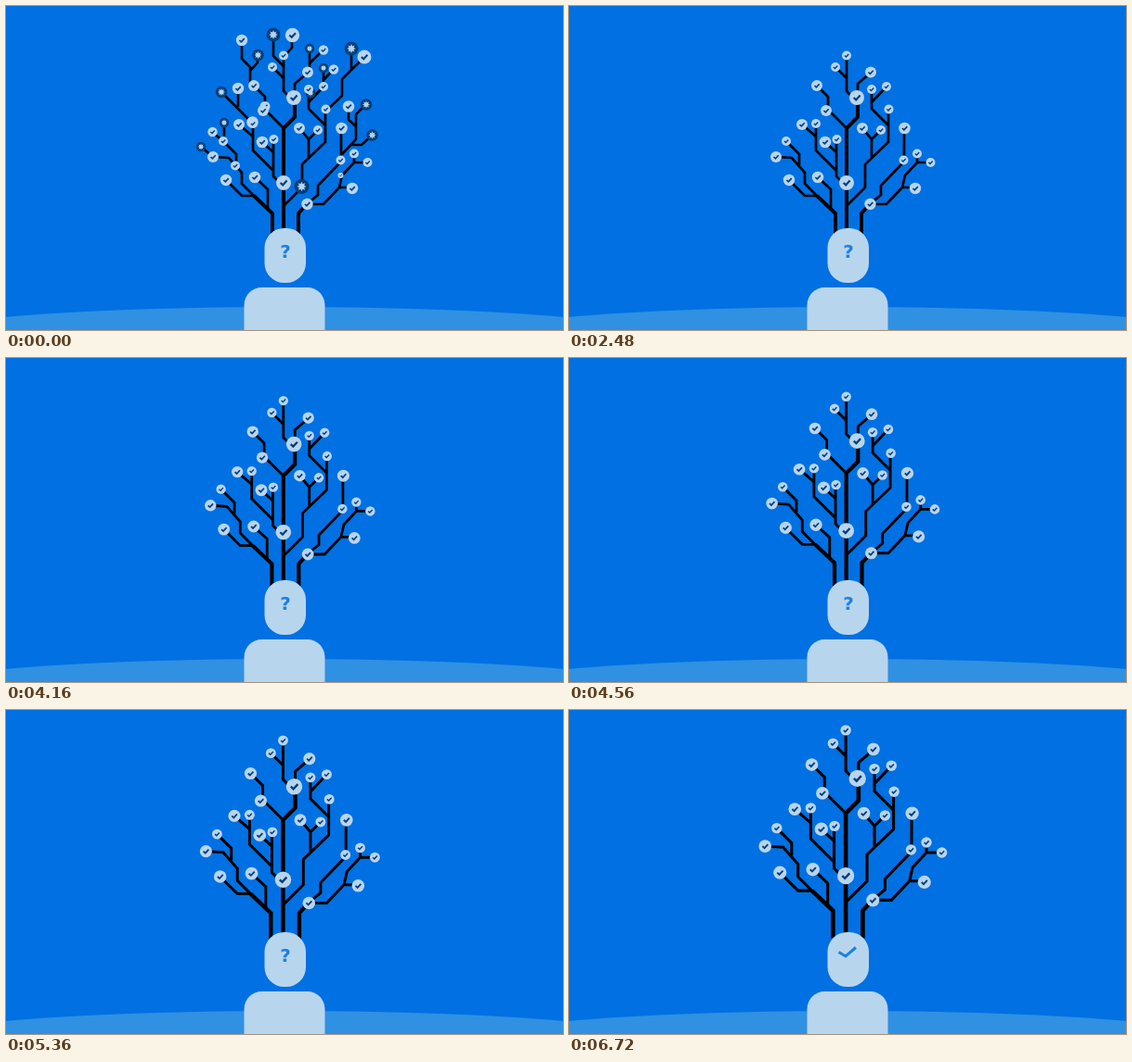
These frames come from a looping animation (600 px wide and 350 px high, 8000 ms). An HTML page with a canvas:

```html
<!DOCTYPE html>
<html lang="en">
<head>
<meta charset="utf-8">
<title>Growing knowledge tree</title>
<style>
html, body { margin: 0; width: 100%; height: 100%; overflow: hidden; background: #0070e2; }
canvas { display: block; width: 600px; height: 350px; }
</style>
</head>
<body>
<canvas id="stage" width="600" height="350"></canvas>
<script>
const ctx = document.getElementById('stage').getContext('2d');
const SKY = '#0070e2', HILL = '#3090e2', LIGHT = '#b8d5ee', DARK = '#043e78', MARK = '#1c80e0';
const LOOP = 8000, STEP = 80;
const ROOT = { x: 305, y: 274 };

const trunks = new Path2D('M287 250V224L267 205M299 250V132L311 120V99M315 250V224L324 214');
const twigs = [
  // left
  'M237 188L254 205H267M282 220V198L268 185M223 163L240 164L254 180V192L270 208M234 146L248 160V172',
  // middle
  'M299 132L279 112V98L267 86M299 53V92L305 98M287 66L299 78M325 72L311 84V99',
  'M288 144V184L295 191M276 147L288 158M266 127V156L288 178M251 128L266 141',
  'M299 216L319 196V171L344 147V112M326 164V144L316 132M326 144L336 134M326 90V111L344 129M342 87L326 104',
  // right
  'M324 214L336 204V194L361 168V132M324 214H342L359 196L362 183L375 169H389M375 160V169M359 196H373'
].map(d => new Path2D(d));

// x, y, radius
const leaves = [
  [299, 53.5, 5], [287, 66, 5], [325, 71.5, 6], [267, 86, 6], [310, 99, 8], [277, 113, 6],
  [326, 90, 5], [342, 87, 5], [344.5, 111.5, 5], [316, 132, 6], [336, 134, 5], [361.5, 132, 6.3],
  [251, 128, 6], [266, 127, 5], [276, 147, 6.3], [288.5, 144, 5], [234, 146, 5], [223, 163, 6],
  [237, 188, 6.2], [268, 185, 6.3], [299, 191, 8], [360.5, 166.5, 5], [375, 159.5, 5],
  [389.5, 169, 5], [373, 197, 6.2], [324.5, 214, 6.2]
];

// Branches wiped away from the top; "diag" wipes towards the lower right
const pruned = [
  { t: [160, 960], cut: [23, 67], d: 'M288 31V54L299 65M308 31V45L299 55',
    dark: [[288, 31, 7.5]], light: [[308.5, 31.5, 7.7]] },
  { t: [160, 1040], cut: [30, 87], d: 'M254 37V57L263 66V86M271 53V61L263 70',
    dark: [[271.5, 53, 6.3]], light: [[254, 37, 6.2]] },
  { t: [160, 1440], cut: [366, 398], diag: true, d: 'M327 46V67M342 47L327 62',
    dark: [[327, 46, 5.2]], light: [[342, 47.5, 5.2]] },
  { t: [1120, 1880], cut: [83, 130], d: 'M232 93L265 126M250 89V109',
    dark: [[232, 93, 6.2]], light: [[250, 89, 6.2], [265.5, 125.5, 6.3]] },
  { t: [1310, 2100], cut: [38, 114], d: 'M372 46V68M386 55L362 79V97L346 112',
    dark: [[372, 46, 7.5]], light: [[386, 55, 7.5]] },
  { t: [1640, 2120], cut: [62, 88], d: 'M342 67V86M353 68L342 80',
    dark: [[342, 67, 5.2]], light: [[353, 68.5, 5.2]] },
  { t: [1480, 2160], cut: [100, 162], d: 'M369 108V123L377 130M388 106L377 117V144L362 160',
    dark: [[388, 106.5, 6.2]], light: [[369, 108.5, 6.3]] },
  { t: [1840, 2160], cut: [87, 114], d: '', dark: [[328, 94, 5.5]], light: [[279, 108.5, 5.5]] },
  { t: [1880, 2320], cut: [133, 152], d: 'M395 139L383 150H370', dark: [[394.5, 139.5, 6.3]], light: [] },
  { t: [1880, 2440], cut: [121, 166], d: 'M235 126V146M222 136L234 146M210 152L223 163',
    dark: [[235, 126, 5.2], [210, 152, 5.2]], light: [[222.5, 136, 5.2]] },
  { t: [2040, 2480], cut: [167, 204], d: '', dark: [[318.5, 195, 8]], light: [[247, 172.5, 5], [360.5, 183, 3]] }
];
for (const p of pruned) p.path = new Path2D(p.d);

const part = (t, a, b) => Math.min(1, Math.max(0, (t - a) / (b - a)));

function disc(x, y, r, fill) {
  ctx.fillStyle = fill;
  ctx.beginPath();
  ctx.arc(x, y, r, 0, 7);
  ctx.fill();
}

function box(x, y, w, h, r) {
  ctx.fillStyle = LIGHT;
  ctx.beginPath();
  ctx.roundRect(x, y, w, h, r);
  ctx.fill();
}

function tick([x, y, r]) {
  disc(x, y, r, LIGHT);
  ctx.strokeStyle = DARK;
  ctx.lineWidth = r * 0.27;
  ctx.beginPath();
  ctx.moveTo(x - r * 0.42, y);
  ctx.lineTo(x - r * 0.1, y + r * 0.3);
  ctx.lineTo(x + r * 0.45, y - r * 0.3);
  ctx.stroke();
}

function burst([x, y, r]) {
  disc(x, y, r, DARK);
  ctx.fillStyle = LIGHT;
  ctx.beginPath();
  for (let i = 0; i < 16; i++) {
    const a = i * Math.PI / 8, q = r * (i % 2 ? 0.36 : 0.66);
    ctx.lineTo(x + q * Math.sin(a), y - q * Math.cos(a));
  }
  ctx.fill();
}

function lines(path, width) {
  ctx.strokeStyle = '#000';
  ctx.lineWidth = width;
  ctx.stroke(path);
}

function drawPruned(p, t) {
  const k = part(t, ...p.t);
  if (k === 1) return;
  ctx.save();
  if (k > 0) {
    const c = p.cut[0] + (p.cut[1] - p.cut[0]) * k;
    ctx.beginPath();
    if (p.diag) {
      ctx.moveTo(c, 0);
      ctx.lineTo(600, 0);
      ctx.lineTo(600, c);
      ctx.lineTo(0, c);
    } else ctx.rect(0, c, 600, 350);
    ctx.clip();
  }
  lines(p.path, 2.6);
  p.dark.forEach(burst);
  p.light.forEach(tick);
  ctx.restore();
}

function treeScale(t) {
  if (t < 3280) return 1 + 0.0495 * Math.max(0, t - 2880) / 1000;
  return 1 + 0.1435 * part(t, 3480, 6380);
}

function drawTree(t) {
  const s = treeScale(t);
  ctx.save();
  ctx.translate(ROOT.x, ROOT.y);
  ctx.scale(s, s);
  ctx.translate(-ROOT.x, -ROOT.y);
  twigs.forEach(p => lines(p, 2.7));
  lines(trunks, 4);
  pruned.forEach(p => drawPruned(p, t));
  leaves.forEach(tick);
  ctx.restore();
}

function drawFace(t) {
  const gone = part(t, 5900, 6380), shown = part(t, 6380, 6720);
  ctx.save();
  ctx.beginPath();
  ctx.rect(285, 255 + 19 * gone, 32, 19 * (1 - gone));
  ctx.clip();
  ctx.fillStyle = MARK;
  ctx.font = 'bold 20px "DejaVu Sans", sans-serif';
  ctx.textAlign = 'center';
  ctx.fillText('?', 301, 272);
  ctx.restore();

  ctx.save();
  ctx.beginPath();
  ctx.rect(288, 252, 24 * shown, 20);
  ctx.clip();
  ctx.strokeStyle = MARK;
  ctx.lineWidth = 3;
  ctx.beginPath();
  ctx.moveTo(290.5, 261.5);
  ctx.lineTo(298, 266);
  ctx.lineTo(309, 256.5);
  ctx.stroke();
  ctx.restore();
}

function draw(t) {
  ctx.fillStyle = SKY;
  ctx.fillRect(0, 0, 600, 350);
  ctx.fillStyle = HILL;
  ctx.beginPath();
  ctx.ellipse(300, 364, 430, 39, 0, 0, 7);
  ctx.fill();
  drawTree(t);
  box(256.5, 304, 87, 70, 19);
  box(278.5, 240, 44.5, 59, 21);
  drawFace(t);
}

function frame() {
  const t = performance.now() % LOOP;
  draw(Math.floor(t / STEP) * STEP);
  requestAnimationFrame(frame);
}
frame();
</script>
</body>
</html>
```
